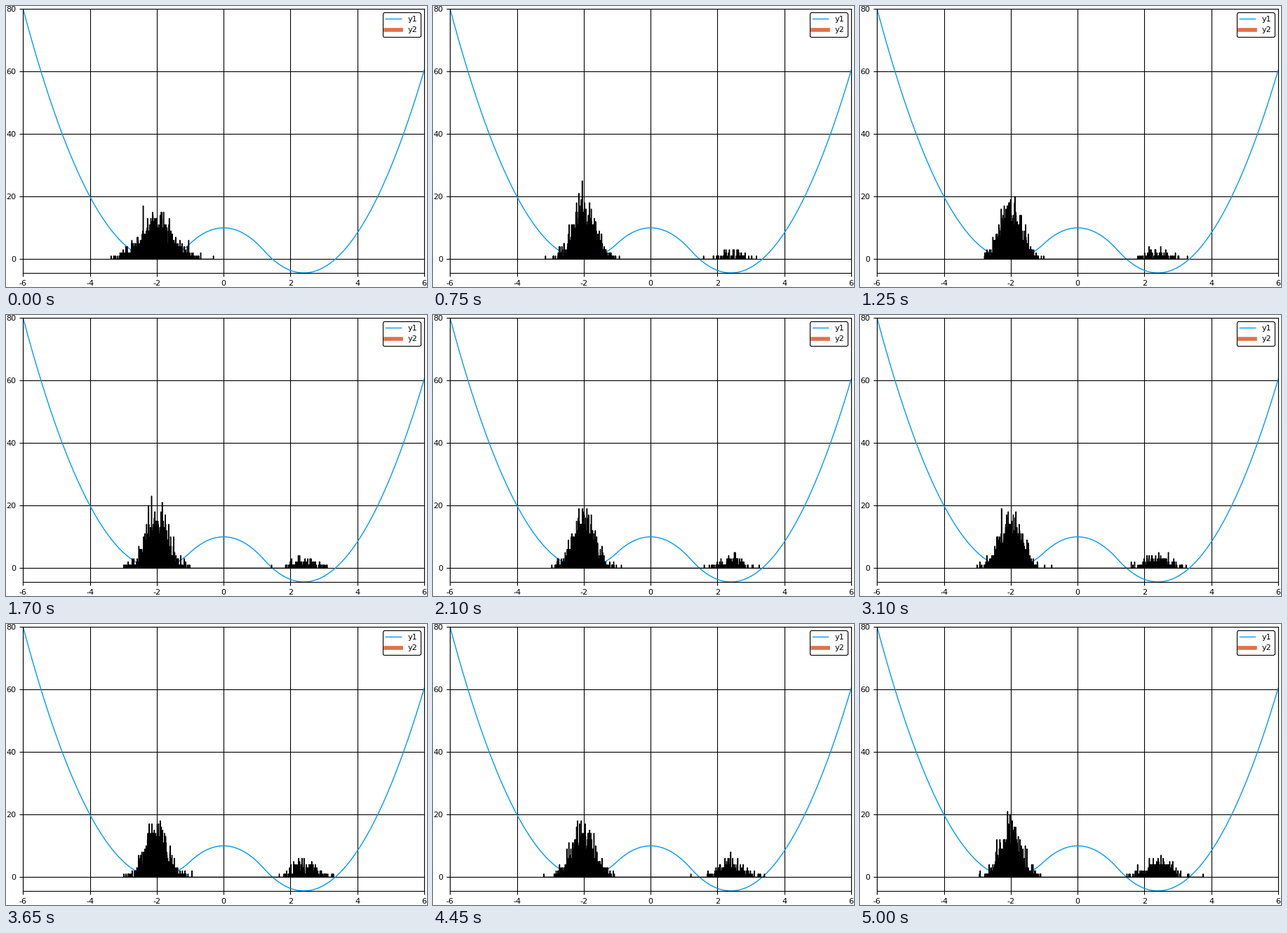
A matplotlib script that plays this animation: 600x400 px, repeating every 5.05 s.

```python
import numpy as np
import matplotlib.pyplot as plt
from matplotlib.animation import FuncAnimation
from matplotlib.collections import PolyCollection
from matplotlib.lines import Line2D

W, H, DPI = 600, 400, 100
LEFT, RIGHT, BOTTOM, TOP = 24.28, 596.06, 20.05, 396.06   # plot area, px
FRAMES, STEP_MS = 101, 50
COUNT, BIN = 1200, 0.01
LEFT_WELL, RIGHT_WELL = -2.0, 2.4
SPREAD = 0.1 ** 0.5      # thermal width of a well with curvature 10
MEMORY = 0.5             # correlation between successive steps
BLUE, ORANGE = "#009AFA", "#E36F47"


def potential(x):
    return np.where(x < -1, 5 * (x + 2) ** 2,
                    np.where(x < 1.2, 10 - 5 * x ** 2,
                             5 * (x - 2.4) ** 2 - 4.4))


def simulate():
    """Particles jitter in the left well and hop to the right one over time."""
    rng = np.random.default_rng(12)
    z = 1.45 * rng.standard_normal(COUNT)
    hop = (np.arange(COUNT) / COUNT - 0.03) / 0.002
    hop = rng.permutation(np.maximum(hop, rng.uniform(1, 14, COUNT)))
    kick = (1 - MEMORY ** 2) ** 0.5
    steps = []
    for n in range(FRAMES):
        well = np.where(n >= hop, RIGHT_WELL, LEFT_WELL)
        steps.append(well + SPREAD * z)
        z = MEMORY * z + kick * rng.standard_normal(COUNT)
    return steps


def bars(x):
    """Corner points of every histogram bar, empty ones included."""
    k = np.floor(x / BIN).astype(int)
    heights = np.bincount(k - k.min())
    left = (k.min() + np.arange(len(heights))) * BIN
    right, zero = left + BIN, np.zeros(len(heights))
    return np.stack([np.column_stack([left, zero]),
                     np.column_stack([left, heights]),
                     np.column_stack([right, heights]),
                     np.column_stack([right, zero])], axis=1)


plt.rcParams["font.family"] = "DejaVu Sans"
plt.rcParams["axes.unicode_minus"] = False

fig = plt.figure(figsize=(W / DPI, H / DPI), dpi=DPI, facecolor="white")
ax = fig.add_axes([LEFT / W, BOTTOM / H, (RIGHT - LEFT) / W, (TOP - BOTTOM) / H])
ax.set(xlim=(-6, 6), ylim=(-4.4, 80),
       xticks=range(-6, 7, 2), yticks=range(0, 81, 20))
ax.tick_params(labelsize=8)
ax.set_axisbelow(True)
ax.grid(color="black", lw=0.8)

x = np.linspace(-6, 6, 601)
ax.plot(x, potential(x), color=BLUE, lw=1)
hist = PolyCollection([], facecolor="black", edgecolor="black", lw=1,
                      joinstyle="miter", snap=False, zorder=3)
ax.add_collection(hist, autolim=False)

keys = [Line2D([], [], color=BLUE, lw=1),
        Line2D([], [], color=ORANGE, lw=4)]
legend = ax.legend(keys, ["y1", "y2"], loc="upper right", fontsize=8,
                   framealpha=1, edgecolor="black")
legend.get_frame().set_linewidth(0.8)
legend.set_zorder(5)

walk = simulate()


def draw(n):
    hist.set_verts(bars(walk[n]))
    return [hist]


anim = FuncAnimation(fig, draw, frames=FRAMES, interval=STEP_MS,
                     init_func=lambda: draw(0), repeat=True, repeat_delay=0)
plt.show()
```
